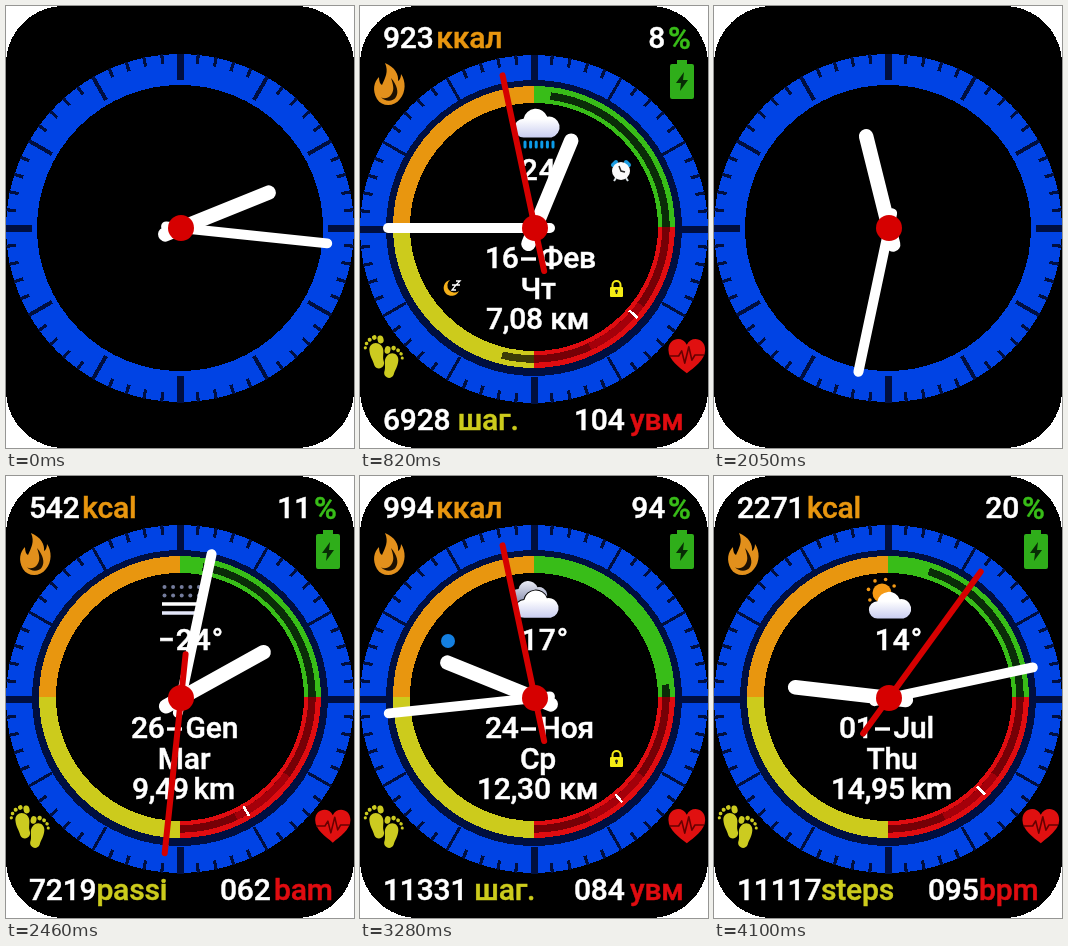
An HTML page that plays this animation: 348x442 px, repeating every 4.51 s.

```html
<!DOCTYPE html>
<html lang="en">
<head>
<meta charset="utf-8">
<title>Watch face</title>
<style>
html, body { margin: 0; width: 100%; height: 100%; overflow: hidden; background: #fff; }
svg { display: block; width: 100vw; height: 100vh; }
text { font: 500 30px Roboto, "Noto Sans", sans-serif; letter-spacing: -.2px; stroke-width: .5px; white-space: pre; }
</style>
</head>
<body>
<svg id="stage" viewBox="0 0 348 442">
  <defs>
    <linearGradient id="cloudFill" x1="0" y1="0" x2="0" y2="1">
      <stop offset=".35" stop-color="#fff"/><stop offset="1" stop-color="#c9cdf0"/>
    </linearGradient>
    <linearGradient id="shadeFill" x1="0" y1="0" x2="0" y2="1">
      <stop offset="0" stop-color="#eceef8"/><stop offset="1" stop-color="#858baa"/>
    </linearGradient>
    <path id="cloud" d="M-14 13A9 9 0 0 1-14-5A12 12 0 0 1 9-7A10.2 10.2 0 0 1 13 13Z"/>
    <g id="foot">
      <path d="M-5-6C-8-1-4 3-4 8C-5 15 4 16 5 10C5 5 7 2 6-4C5-10-2-11-5-6Z"/>
      <ellipse cx="-6" cy="-11" rx="2.7" ry="3.6"/>
      <circle cx="-1" cy="-14" r="2.1"/><circle cx="3.5" cy="-13" r="1.8"/>
      <circle cx="7" cy="-10.5" r="1.6"/><circle cx="9" cy="-7" r="1.4"/>
    </g>
  </defs>
  <rect width="348" height="442" rx="58" shape-rendering="crispEdges"/>
  <g id="plain" shape-rendering="crispEdges"></g>
  <g id="full">
    <g id="dial" shape-rendering="crispEdges"></g>
    <g id="gauges" shape-rendering="crispEdges"></g>
    <g transform="translate(29 79)">
      <path fill="#e2901c" d="M-4-22C6-18 10-10 9-4C11-5 12-8 12-11C17-4 17 7 11 14C5 22-7 22-12 14C-17 5-15-3-10-8C-10-4-9-1-7 0C-4-7 0-13-4-22Z"/>
      <path fill="#1c1002" d="M2-7C8 0 10 7 7 12C4 17-4 17-8 12C-6 14-1 14 2 10C6 5 4-1 2-7Z"/>
    </g>
    <g transform="translate(322 74)">
      <path fill="#2fae1a" d="M-5-20H5V-16H10Q12-16 12-14V17Q12 19 10 19H-10Q-12 19-12 17V-14Q-12-16-10-16H-5Z"/>
      <path fill="#082d05" d="M2-8L-6 3H-1L-2 11L6 0H1Z"/>
    </g>
    <g fill="#cccb20">
      <use href="#foot" transform="translate(17 347) rotate(-14) scale(-1.12 1.12)"/>
      <use href="#foot" transform="translate(31 357) rotate(14) scale(1.08)"/>
    </g>
    <g id="heart">
      <path fill="#e01010" d="M0 17C-7 11-18 4-18-6C-18-18-4-20 0-11C4-20 18-18 18-6C18 4 7 11 0 17Z"/>
      <path fill="none" stroke="#600" stroke-width="1.6" stroke-linejoin="round" d="M-17 0H-8L-5-5L-2 7L2-9L5 4L8-1H17"/>
    </g>
    <g id="sky"></g>
    <g id="status"></g>
    <g id="texts"></g>
  </g>
  <g id="hands" stroke-linecap="round"></g>
</svg>
<script>
const STEP = 410;
const NAVY = '#000f40', BLUE = '#0043e4', RED = '#d60000';
const ORANGE = '#e8960f', GREEN = '#38bd18', YELLOW = '#cccb1c', PULSE = '#e00c10';
const $ = id => document.getElementById(id);

const line = (x1, y1, x2, y2, color, w, extra = '') =>
  `<line x1="${x1}" y1="${y1}" x2="${x2}" y2="${y2}" stroke="${color}" stroke-width="${w}" ${extra}/>`;
const circle = (x, y, r, fill, extra = '') =>
  `<circle cx="${x}" cy="${y}" r="${r}" fill="${fill}" ${extra}/>`;
const text = (x, y, s, color = '#fff', anchor = 'start', style = '') =>
  `<text x="${x}" y="${y}" text-anchor="${anchor}" fill="${color}" stroke="${color}" style="${style}">${s}</text>`;
const at = (shape, x, y) => `<g transform="translate(${x} ${y})">${shape}</g>`;

// Angles are clockwise degrees from twelve o'clock.
function polar(cx, cy, r, deg) {
  const a = deg * Math.PI / 180;
  return [cx + r * Math.sin(a), cy - r * Math.cos(a)];
}
const onGauge = (r, deg) => polar(174, 221, r, deg);
const arc = (from, to, r, color, w) =>
  `<path d="M${onGauge(r, from)}A${r} ${r} 0 0 1 ${onGauge(r, to)}" fill="none" stroke="${color}" stroke-width="${w}"/>`;

function ring(cx, cy, inner, hourWidth) {
  let s = circle(cx, cy, (174 + inner) / 2, 'none', `stroke="${BLUE}" stroke-width="${174 - inner}"`);
  for (let i = 0; i < 60; i++) {
    const hour = i % 5 === 0, w = i % 15 === 0 ? 7 : hour ? hourWidth : 3.2;
    s += line(...polar(cx, cy, hour ? 148 : 165, i * 6), ...polar(cx, cy, 174.5, i * 6), NAVY, w);
  }
  return s;
}

const LANG = {
  ru: { kcal: 'ккал', steps: ' шаг.', bpm: 'увм', km: 'км', bpmX: 270 },
  en: { kcal: 'kcal', steps: 'steps', bpm: 'bpm', km: 'km', bpmX: 265 },
  it: { kcal: 'kcal', steps: 'passi', bpm: 'bam', km: 'km', bpmX: 268 }
};

const face = (lang, time, kcal, battery, steps, gap, bpm, temp, sky, day, month, week, km, icons, beat) =>
  ({ lang, time, kcal, battery, steps, gap, bpm, temp, sky, day, month, week, km, icons, beat });

const FACES = [
  { time: [2, 16] },
  face('ru', [7, 21, 12], '615', 45, '4210', 32, '076', '9°', 'sun', '12', 'Май', 'Пн', '3,25', 'alarm lock', 0),
  face('ru', [0, 45, 58], '923', 8, '6928', 14, '104', '24°', 'rain', '16', 'Фев', 'Чт', '7,08', 'alarm moon lock', 1),
  face('en', [10, 8, 24], '738', 53, '5160', 25, '088', '21°', 'clouds', '19', 'Jun', 'Fri', '4,62', 'lock', 0),
  face('en', [5, 50, 39], '469', 71, '3494', 39.5, '130', '−3°', 'rain', '08', 'Mar', 'Mon', '1,80', 'alarm lock', 0),
  { time: [11, 32] },
  face('it', [2, 2, 31], '542', 11, '7219', 0, '062', '−24°', 'fog', '26', 'Gen', 'Mar', '9,49', '', 0),
  face('it', [4, 37, 17], '861', 62, '10254', 0, '071', '18°', 'sun', '14', 'Set', 'Gio', '11,70', 'lock', 0),
  face('ru', [9, 44, 58], '994', 94, '11331', 0, '084', '17°', 'clouds', '24', 'Ноя', 'Ср', '12,30', 'link lock', 1),
  face('it', [1, 26, 44], '653', 37, '6045', 20, '110', '12°', 'rain', '03', 'Ott', 'Ven', '5,86', 'alarm', 1),
  face('en', [9, 13, 6], '2271', 20, '11117', 0, '095', '14°', 'sun', '01', 'Jul', 'Thu', '14,95', '', 1)
];

const cloud = (x, y, fill, k = 1, extra = '') =>
  `<use href="#cloud" transform="translate(${x} ${y}) scale(${k})" fill="url(#${fill})" ${extra}/>`;

const SKY = {
  rain() {
    let s = cloud(178, 118, 'cloudFill', 1.03);
    for (let x = 165; x < 195; x += 5.6) s += line(x, 136, x, 141, '#0c9be8', 3, 'stroke-linecap="round"');
    return s;
  },
  clouds: () => cloud(170, 117, 'shadeFill', .82) +
    cloud(178, 129, 'cloudFill', .98, 'stroke="#000" stroke-width="2" paint-order="stroke"'),
  sun() {
    let s = circle(168, 117, 9.5, '#f59a14');
    for (let a = -120; a <= 60; a += 45) s += circle(...polar(168, 117, 14, a), 1.8, '#f59a14');
    return s + cloud(177, 130, 'cloudFill', .96);
  },
  fog() {
    let s = '';
    for (let i = 0; i < 10; i++) s += circle(158.5 + i % 5 * 8.6, i < 5 ? 111 : 119.5, 2, '#747c9c');
    return s + line(156, 128, 196, 128, '#fff', 3.6) + line(156, 137, 196, 137, '#e4e7fa', 3.6);
  }
};

const ICON = {
  alarm: at(line(-8, -6, -5, -9, '#1a9be0', 4, 'stroke-linecap="round"') +
    line(8, -6, 5, -9, '#1a9be0', 4, 'stroke-linecap="round"') +
    line(-5, 7, -7, 10, '#dde6ea', 2) + line(5, 7, 7, 10, '#dde6ea', 2) +
    circle(0, 0, 9, '#fafafa') +
    '<path d="M-2-5L0 0L4 1" fill="none" stroke="#222" stroke-width="1.5"/>', 261, 165),
  moon: at('<path fill="#f5b01a" d="M-1-8A8 8 0 1 0 8 3A6 6 0 0 1-1-8Z"/>' +
    '<path fill="none" stroke="#fff" stroke-width="1.3" d="M1-3H5L1 2H5M5-7H9L5-3H9"/>', 91, 282),
  lock: at('<path d="M-4-1V-4A4 4 0 0 1 4-4V-1" fill="none" stroke="#f4ec14" stroke-width="2"/>' +
    '<rect x="-6.5" y="-2" width="13" height="10" rx="1" fill="#f4ec14"/>' +
    circle(0, 2, 1.5, '#222') + line(0, 2, 0, 5, '#222', 1.4), 256.5, 283),
  link: circle(88, 165, 7, '#147fe0')
};

function gauges(f) {
  const pulse = 177.3 - .443 * f.bpm;
  const angle = 270 - pulse - 2.7 - 2 * (87.3 - pulse + 0) * 0;
  return arc(270, 360, 132.5, ORANGE, 17) +
    arc(0, 90, 132.5, GREEN, 17) +
    arc(90, 180, 132.5, PULSE, 17) +
    arc(180, 270, 132.5, YELLOW, 17) +
    arc(f.battery * .9, 90, 132, '#0a2c08', 7.5) +
    arc(90, 180, 132, '#760006', 7.5) +
    arc(126, 155, 132, '#a4000a', 7.5) +
    (f.gap ? arc(180, 180 + f.gap, 132, '#3c3b06', 7.5) : '') +
    line(...onGauge(126.5, pulse), ...onGauge(137.5, pulse), '#fff', 2.6);
}

function texts(f) {
  const l = LANG[f.lang], wide = f.km.length > 4;
  const after = s => 24 + s.length * 16.6;
  return text(23, 42, f.kcal) + text(after(f.kcal) + 2.5, 42, l.kcal, ORANGE) +
    text(305, 42, f.battery, '#fff', 'end') + text(308, 42.5, '%', GREEN, 'start', 'font-size:31px') +
    text(23, 423.5, f.steps) + text(after(f.steps), 423.5, l.steps, YELLOW) +
    text(214, 423.5, f.bpm) + text(l.bpmX, 423.5, l.bpm, PULSE) +
    text(185, 174, f.temp, '#fff', 'middle', 'letter-spacing:1px') +
    text(125, 262, f.day) + line(161, 253, 176, 253, '#fff', 3.4) + text(179.5, 261.5, f.month) +
    text(178, 293, f.week, '#fff', 'middle') +
    text(wide ? 117 : 126, 323, f.km) + text(wide ? 238 : 229, 323, l.km, '#fff', 'end');
}

function hands([h, m, s]) {
  const hand = (deg, tail, tip, color, w) =>
    line(...polar(175, 222, -tail, deg), ...polar(175, 222, tip, deg), color, w);
  return hand(h * 30 + m / 2, 17, 94.5, '#fff', 14.5) +
    hand(m * 6, 15, 147, '#fff', 10) +
    (s === undefined ? '' : hand(s * 6, 44, 156, RED, 6)) +
    circle(175, 222, 13, RED);
}

function draw(f) {
  const full = 'lang' in f;
  $('plain').style.display = full ? 'none' : '';
  $('full').style.display = full ? '' : 'none';
  $('hands').innerHTML = hands(f.time);
  if (!full) return;
  $('gauges').innerHTML = gauges(f);
  $('sky').innerHTML = SKY[f.sky]();
  $('status').innerHTML = f.icons.split(' ').map(name => ICON[name] || '').join('');
  $('texts').innerHTML = texts(f);
  $('heart').setAttribute('transform', `translate(326.8 350) scale(${f.beat ? 1.02 : .98})`);
}

$('plain').innerHTML = ring(174, 222, 143, 4);
$('dial').innerHTML = ring(174, 223, 147, 3) +
  circle(174, 222, 144, 'none', `stroke="${NAVY}" stroke-width="8"`);

let shown = -1;
const start = performance.now();
function tick() {
  const i = Math.floor((performance.now() - start) / STEP) % FACES.length;
  if (i !== shown) draw(FACES[shown = i]);
  requestAnimationFrame(tick);
}
tick();
</script>
</body>
</html>
```
